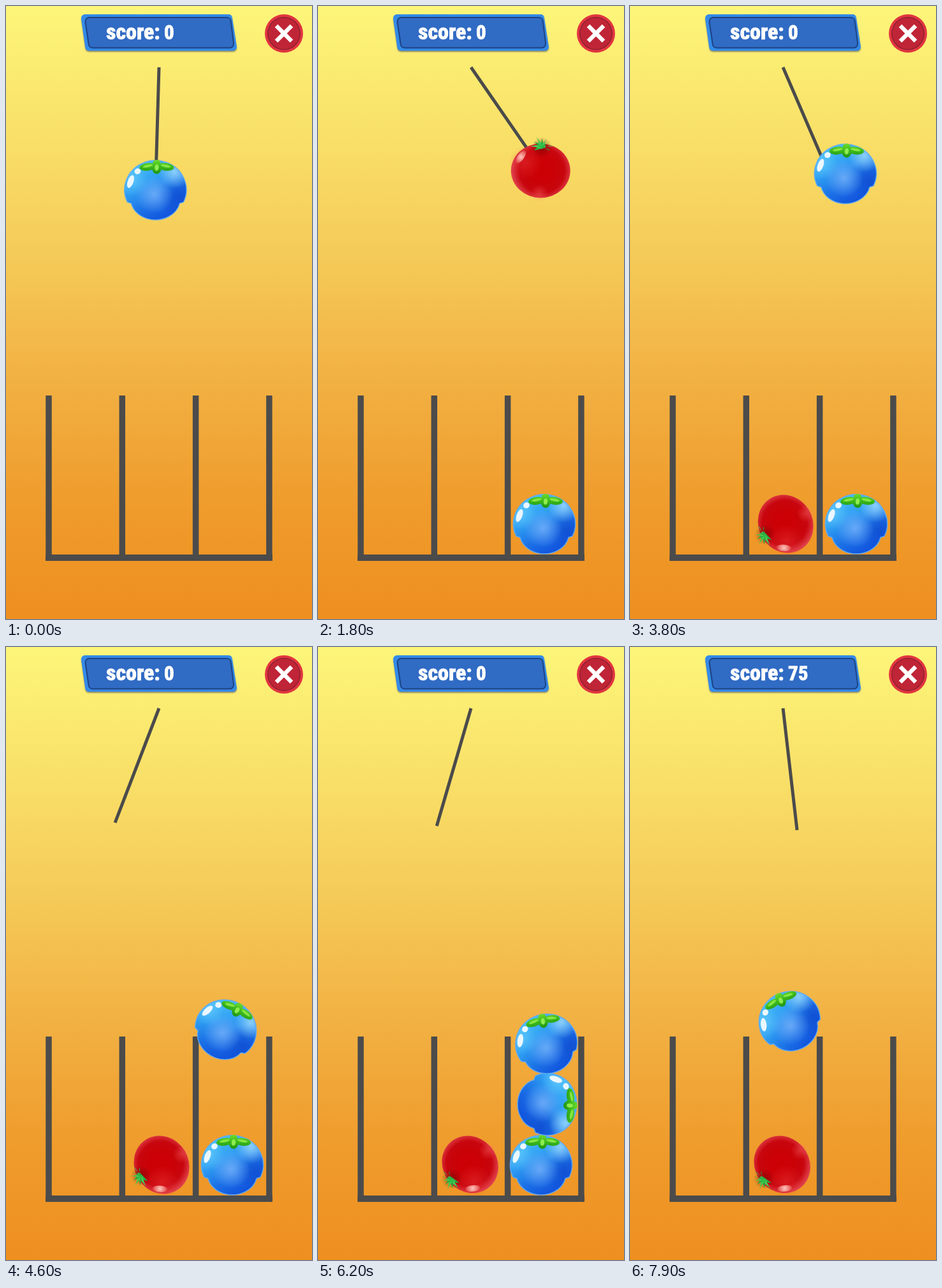
These frames come from a looping animation (480x960 px, 8 s). An HTML page with a canvas:

```html
<!DOCTYPE html>
<html lang="en">
<head>
<meta charset="utf-8">
<title>Fruit drop</title>
<style>
html, body { margin: 0; width: 100%; height: 100%; overflow: hidden; background: #f2b446; }
canvas { display: block; width: 480px; height: 960px; }
</style>
</head>
<body>
<canvas id="stage" width="480" height="960"></canvas>
<script>
const ctx = document.getElementById('stage').getContext('2d');
const TAU = Math.PI * 2, GREY = '#4b4b4b';
const LOOP = 8000, STEP = 100, CLEAR = 6400, JOLT = 4800;
const PIVOT = { x: 240, y: 96 }, ROPE = 192;
const GRAVITY = 980, DAMP = 0.13, RESPAWN = 1000;
const WALL_TOP = 610, WALL_W = 9.5;
const walls = [0, 1, 2, 3].map(i => 67 + 115.3 * i);

// Each fruit leaves the rope at its release time and settles in the rest pose.
const fruits = [
  { draw: berry, r: 48, release: 249, end: CLEAR, rest: { x: 355, y: 811, rot: 0 }, slide: 5 },
  { draw: tomato, r: 46, release: 2314, end: LOOP, rest: { x: 240.6, y: 813, rot: -121 }, slide: 5, roll: 10 },
  { draw: berry, r: 48, release: 3749, end: CLEAR, rest: { x: 360, y: 716, rot: 90 } },
  { draw: berry, r: 48, release: 5235, end: CLEAR, rest: { x: 355, y: 621, rot: -20 } },
  { draw: berry, r: 48, release: 7019, end: LOOP, rest: { x: 235, y: 716, rot: -43 } }
];

function ropeEnd(t) {
  const a = Math.PI / 4 * Math.sin(4 * t / 1000 - 0.037);
  return { x: PIVOT.x + ROPE * Math.sin(a), y: PIVOT.y + ROPE * Math.cos(a), rot: 0 };
}

// Find where each fruit first strikes a wall top, or its resting height.
fruits.forEach((f, i) => {
  f.spawn = i ? fruits[i - 1].release + RESPAWN : -Infinity;
  f.start = ropeEnd(f.release);
  const gap = Math.min(...walls.map(x => Math.abs(x - f.start.x))) - WALL_W / 2;
  const normal = Math.min(1, gap / f.r);
  f.hitY = normal < 1 ? WALL_TOP - f.r * Math.sqrt(1 - normal ** 2) : f.rest.y;
  f.hitTime = Math.sqrt(2 * (f.hitY - f.start.y) / GRAVITY);
  f.slip = GRAVITY * f.hitTime * normal ** 2;
});

const settle = s => s > 0 ? 1 - Math.exp(-s / DAMP) : 0;

function pose(f, t) {
  if (t < f.release) return ropeEnd(t);
  const s = (t - f.release) / 1000, { start, rest } = f;
  if (s < f.hitTime) return { x: start.x, y: start.y + GRAVITY * s * s / 2, rot: 0 };
  const after = s - f.hitTime, k = settle(after), j = settle((t - JOLT) / 1000);
  return {
    x: start.x + (rest.x - start.x) * k - (f.slide || 0) * j,
    y: Math.min(rest.y, f.hitY + f.slip * after + GRAVITY * after * after / 2),
    rot: (rest.rot * k - (f.roll || 0) * j) * Math.PI / 180
  };
}

function paint(gradient, colors) {
  colors.forEach((c, i) => gradient.addColorStop(i / (colors.length - 1), c));
  return gradient;
}
const radial = (x, y, r, ...colors) => paint(ctx.createRadialGradient(x, y, 0, x, y, r), colors);
const linear = (x0, y0, x1, y1, ...colors) => paint(ctx.createLinearGradient(x0, y0, x1, y1), colors);

function oval(x, y, rx, ry, rot, fill) {
  ctx.beginPath();
  ctx.ellipse(x, y, rx, ry, rot, 0, TAU);
  ctx.fillStyle = fill;
  ctx.fill();
}

function glow(x, y, r, rgb, alpha) {
  oval(x, y, r, r, 0, radial(x, y, r, `rgba(${rgb},${alpha})`, `rgba(${rgb},0)`));
}

function line(x0, y0, x1, y1, width, color) {
  ctx.beginPath();
  ctx.moveTo(x0, y0);
  ctx.lineTo(x1, y1);
  ctx.lineWidth = width;
  ctx.strokeStyle = color;
  ctx.stroke();
}

function roundPoly(points, r) {
  const n = points.length, [ax, ay] = points[0], [bx, by] = points[n - 1];
  ctx.beginPath();
  ctx.moveTo((ax + bx) / 2, (ay + by) / 2);
  points.forEach((p, i) => ctx.arcTo(...p, ...points[(i + 1) % n], r));
  ctx.closePath();
}

function berry() {
  const body = new Path2D();
  body.ellipse(0, 0, 48.5, 46, 0, Math.PI - 0.43, TAU + 0.43);
  body.ellipse(0, 14, 39, 33, 0, 0.22, Math.PI - 0.22);
  body.closePath();
  ctx.save();
  ctx.clip(body);
  ctx.fillStyle = linear(-28, -42, 22, 46, '#4cc2f8', '#2f9ff3', '#1b70e6', '#0f4fdc');
  ctx.fillRect(-50, -50, 100, 100);
  glow(36, 10, 32, '14,72,205', 0.7);
  glow(30, -28, 26, '170,225,255', 0.75);
  glow(-36, -14, 24, '120,215,255', 0.5);
  glow(-2, 7, 30, '120,178,250', 0.8);
  ctx.restore();
  ctx.lineJoin = 'round';
  ctx.lineWidth = 1.5;
  ctx.strokeStyle = 'rgba(95,170,248,.9)';
  ctx.stroke(body);
  oval(-39, -13, 4.5, 10.5, 0.35, '#eaf7ff');
  oval(-28, -29, 5, 4.5, -0.5, '#eaf7ff');
  const leaf = linear(0, -47, 0, -25, '#6ddb2c', '#3dba1c', '#1f9316');
  for (const side of [-1, 1]) {
    oval(2 + side * 14, -36, 13, 6, side * 0.12, leaf);
    oval(2 + side * 14, -37.5, 8, 2, side * 0.2, '#86e644');
  }
  oval(2, -43, 6, 4, 0, leaf);
  oval(2, -34, 7.5, 9, 0, leaf);
  oval(2, -35, 3.2, 5, 0.1, '#8dec50');
}

function tomato() {
  ctx.translate(0, 3.5);
  oval(0, 0.5, 46.5, 42.5, 0, radial(2, 0, 47, '#cb0004', '#cc0005', '#c90308', '#c8060e', '#e0404a'));
  glow(-24, -12, 26, '240,60,60', 0.4);
  glow(-2, 36, 14, '255,120,115', 0.35);
  glow(2, -36, 16, '90,0,0', 0.5);
  oval(-31, -21, 5, 12, 0.62, radial(-31, -21, 13, '#ffc4be', '#ee7d78', '#d8262c'));
  for (let i = -1; i <= 7; i++) {
    const a = Math.PI * (1 + i / 6), c = Math.cos(a), s = Math.sin(a);
    const reach = i % 2 ? 0.85 : 1.05;
    ctx.beginPath();
    ctx.moveTo(2 - 4 * s, -37 + 3 * c);
    ctx.quadraticCurveTo(2 + 10 * c, -40 + 8 * s, 2 + 17 * c * reach, -38 + 16 * s * reach);
    ctx.quadraticCurveTo(2 + 7 * c, -36 + 7 * s, 2 + 4 * s, -37 - 3 * c);
    ctx.fillStyle = i % 2 ? '#27ad42' : '#45cc52';
    ctx.fill();
  }
}

function background() {
  ctx.fillStyle = linear(0, 0, 0, 960, '#fdf67a', '#f9e169', '#f5cb58', '#f2b244', '#ef9d2d', '#ee8f20');
  ctx.fillRect(0, 0, 480, 960);
}

// Largest size at which the text fits the given width.
function fitFont(text, width, max) {
  let size = max + 1;
  do {
    size--;
    ctx.font = `condensed 900 ${size}px "Roboto Condensed", "Noto Sans", Roboto, sans-serif`;
  } while (ctx.measureText(text).width > width && size > 10);
}

function label(text, x, width, max) {
  fitFont(text, width, max);
  ctx.fillText(text, x, 52);
  ctx.strokeText(text, x, 52);
}

function panel(score) {
  ctx.save();
  ctx.shadowColor = 'rgba(70,70,90,.55)';
  ctx.shadowOffsetY = 2;
  ctx.shadowBlur = 2;
  roundPoly([[117, 13], [354, 13], [363, 70], [125, 70]], 6);
  ctx.fillStyle = '#348ae8';
  ctx.fill();
  ctx.restore();
  roundPoly([[123.5, 18], [352, 18], [358, 65.5], [130.5, 65.5]], 6);
  ctx.fillStyle = '#306bc4';
  ctx.fill();
  ctx.lineWidth = 2;
  ctx.strokeStyle = '#1c4384';
  ctx.stroke();
  ctx.lineJoin = 'round';
  ctx.lineWidth = 1;
  ctx.fillStyle = ctx.strokeStyle = '#fff';
  label('score:', 157, 86, 40);
  label(score, 248, score.length * 16, 31);
}

function closeButton() {
  oval(436, 43, 30, 30, 0, '#e2353f');
  oval(436, 43, 26, 26, 0, '#8f2132');
  oval(436, 43, 24.5, 24.5, 0, '#bf2536');
  for (const d of [-12, 12]) line(436 - d, 31, 436 + d, 55, 6.5, '#fff');
}

function bins() {
  ctx.fillStyle = GREY;
  walls.forEach(x => ctx.fillRect(x - WALL_W / 2, WALL_TOP, WALL_W, 259));
  ctx.fillRect(62, 859, 356, 10);
}

function render(t) {
  background();
  panel(t < CLEAR ? '0' : '75');
  closeButton();
  bins();
  const tip = ropeEnd(t);
  line(PIVOT.x, PIVOT.y, tip.x, tip.y, 5, GREY);
  for (const f of fruits) {
    if (t < f.spawn || t >= f.end) continue;
    const p = pose(f, t);
    ctx.save();
    ctx.translate(p.x, p.y);
    ctx.rotate(p.rot);
    f.draw();
    ctx.restore();
  }
}

function tick() {
  const t = performance.now() % LOOP;
  render(Math.floor(t / STEP) * STEP);
  requestAnimationFrame(tick);
}
tick();
</script>
</body>
</html>
```
